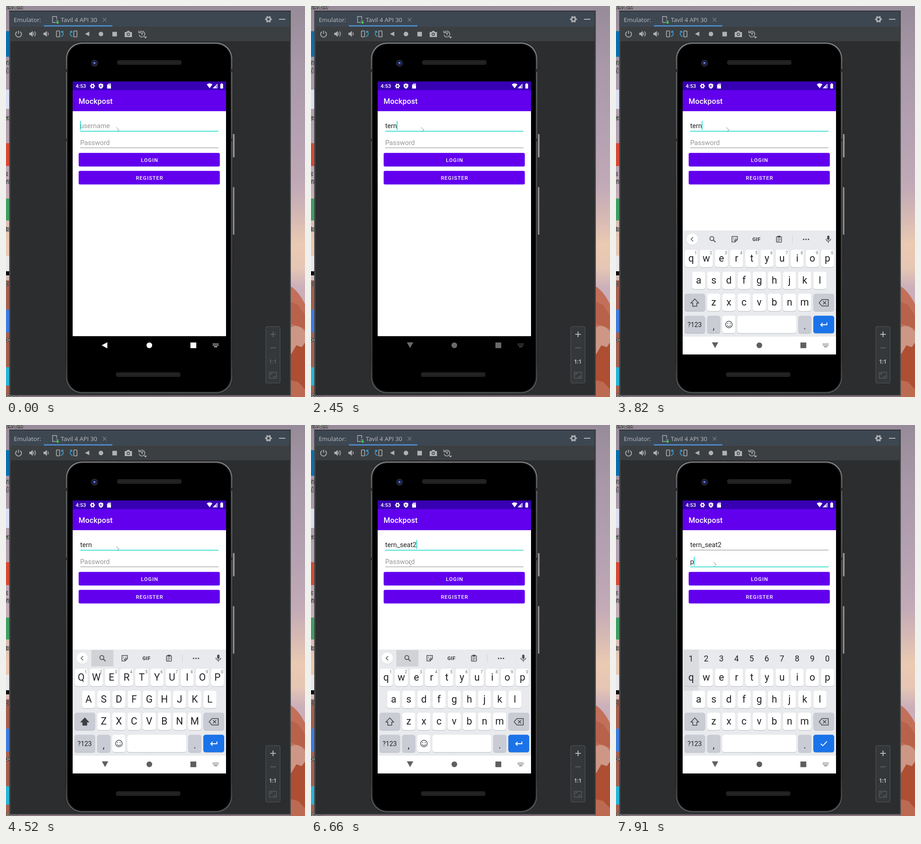
An HTML page that plays this animation: 655 px wide and 855 px high, repeating every 8 s.

```html
<!DOCTYPE html>
<html lang="en">
<head>
<meta charset="utf-8">
<title>Login form typing</title>
<style>
html, body { margin: 0; width: 100%; height: 100%; overflow: hidden; background: #2b2d2e; }
svg { display: block; width: 655px; height: 855px; }
text { font-family: Roboto, "Noto Sans", sans-serif; white-space: pre; }
.ui { font-family: "Open Sans", "Noto Sans", sans-serif; }
.mid { text-anchor: middle; }
.line { fill: none; stroke-width: 1.5; }
</style>
</head>
<body>
<svg viewBox="0 0 655 855" xmlns="http://www.w3.org/2000/svg">
<defs>
  <linearGradient id="sky" x2="0" y2="1">
    <stop offset="0" stop-color="#978b99"/><stop offset=".15" stop-color="#a898a8"/>
    <stop offset=".35" stop-color="#b6a2b2"/><stop offset=".47" stop-color="#c3abb7"/>
    <stop offset=".54" stop-color="#d6b9b4"/><stop offset=".61" stop-color="#eacab2"/>
    <stop offset=".67" stop-color="#e6c6b4"/><stop offset=".72" stop-color="#cbb0bb"/>
    <stop offset="1" stop-color="#b79aa0"/>
  </linearGradient>
  <linearGradient id="rim" x2="0" y2="1">
    <stop offset="0" stop-color="#8b8c8e"/><stop offset=".06" stop-color="#66676a"/>
    <stop offset=".5" stop-color="#4a4b4d"/><stop offset=".9" stop-color="#3a3b3c"/>
    <stop offset="1" stop-color="#5c5d5f"/>
  </linearGradient>
  <linearGradient id="btn" x2="1" y2="0">
    <stop offset="0" stop-color="#5a5a5c"/><stop offset=".5" stop-color="#a4a4a6"/><stop offset="1" stop-color="#6a6a6c"/>
  </linearGradient>
</defs>
<g id="desk"></g>
<g id="win"></g>
<g id="phone"></g>
<g id="app"></g>
<g id="board"></g>
<g id="nav"></g>
<path id="mouse" class="line" style="stroke-width:.9" stroke="#777" d="M.3 .3L6.5 6.3H4.2M2.8 8.2L4.6 10.6"/>
</svg>
<script>
const $ = id => document.getElementById(id);
const rect = (x, y, w, h, fill, rx = 0, more = '') =>
  `<rect x="${x}" y="${y}" width="${w}" height="${h}" fill="${fill}" rx="${rx}" ${more}/>`;
const circle = (x, y, r, fill, more = '') => `<circle cx="${x}" cy="${y}" r="${r}" fill="${fill}" ${more}/>`;
const shape = (d, fill, more = '') => `<path d="${d}" fill="${fill}" ${more}/>`;
const line = (d, color, w = 1.5, more = '') =>
  `<path class="line" d="${d}" stroke="${color}" style="stroke-width:${w}" ${more}/>`;
const text = (x, y, size, fill, str, more = '') =>
  `<text x="${x}" y="${y}" font-size="${size}" fill="${fill}" ${more}>${str}</text>`;
const gear = (x, y, r, color) =>
  `<circle cx="${x}" cy="${y}" r="${r * .84}" fill="none" stroke="${color}" stroke-width="${r * .3}" pathLength="12" stroke-dasharray="1 1" stroke-dashoffset=".5"/>` +
  `<circle cx="${x}" cy="${y}" r="${r * .56}" fill="none" stroke="${color}" stroke-width="${r * .42}"/>`;
const MID = 'class="mid"';

// Desktop showing around the window
function desk() {
  let s = rect(0, 0, 655, 855, 'url(#sky)');
  s += shape('M622 612Q640 622 655 652V855H622Z', '#c3705a');
  s += shape('M622 646L640 654L655 676V706L622 694Z', '#b9624b');
  s += shape('M622 704Q640 692 655 712V760H622Z', '#cd9685');
  s += shape('M622 766L636 742L648 746L655 736V855H622Z', '#ae4f33');
  s += shape('M622 818L640 822L655 838V855H622Z', '#bd6a52');
  s += rect(0, 848, 624, 7, '#85727c') + rect(0, 600, 9, 255, '#a4604f');
  const tiles = [[55, 56, '#0b6fae'], [183, 42, '#dcdff2'], [300, 50, '#d64a36'], [421, 48, '#3f9f62'],
    [546, 42, '#e8e8ea'], [664, 50, '#3e7de0'], [790, 40, '#28b5d8']];
  for (const [y, h, c] of tiles) s += rect(0, y, 7, h, c);
  s += rect(0, 580, 7, 9, '#111');
  const bits = [[128, 're'], [146, 'd'], [249, 'se'], [371, 'c'], [388, 're'], [492, 'to'], [612, 'E'], [734, 'oc']];
  const tag = 'class="ui" stroke="#222" stroke-width="2" paint-order="stroke"';
  for (const [y, w] of bits) s += text(-2, y, 12, '#fff', w, tag);
  return s + text(0, 6, 12, '#fff', 'cle Bin', tag) + text(1, 855, 12, '#fff', 'ook', tag);
}

function frame() {
  const g = '#afb1b3', b = '#389fd6';
  let s = rect(7, 10, 617, 842, '#46484a') + rect(10, 12, 611, 33, '#3d4752') + rect(10, 45, 611, 32, '#3c3f41');
  s += rect(10, 77, 611, 773, '#2b2d2e') + rect(7, 10, 617, 2, '#303236') + rect(621, 12, 1, 838, '#333537');
  s += rect(83, 42, 150, 3, '#4a88c7');
  s += text(17, 34.5, 13.2, '#bbbdbf', 'Emulator:', 'class="ui"') + text(120, 34.5, 13.2, '#bbbdbf', 'Tavil 4 API 30', 'class="ui"');
  s += line('M109 36H102V23H111V29', g, 1.4) + line('M109 32H115M110 36H113', g, 1.2) + circle(113, 36, 2.6, '#3fd24b');
  s += line('M212 26L220 34M220 26L212 34', '#74808a', 1.2);
  s += gear(575, 29, 7.6, g) + rect(598, 28, 14, 2, g);
  s += line('M24 56.2A6.4 6.4 0 1 0 31 56.2M27.5 54V61', g, 1.8);
  const horn = x => shape(`M${x} 58.5h3l4.5-4v13l-4.5-4h-3z`, g);
  s += horn(51) + line('M60 58Q62 61 60 64M62.5 55.5Q67 61 62.5 66.5', g) + horn(82) + line('M91.5 58Q94 61 91.5 64', g);
  s += rect(110.5, 54.5, 7, 13, 'none', 1, `stroke="${g}" stroke-width="1.6"`);
  s += line('M120 67Q127 64 125 58L122 55M122 59V55H126', b, 1.7);
  s += rect(148.5, 54.5, 7, 13, 'none', 1, `stroke="${g}" stroke-width="1.6"`);
  s += line('M146 67Q139 64 141 58L144 55M144 59V55H140', b, 1.7);
  s += shape('M173 61L182.5 56V66Z', g) + circle(208, 61.3, 5, g) + rect(233, 56.5, 10, 10, g);
  s += shape('M260 57h4l2-2.5h4l2 2.5h4v11h-16z', g) + circle(268, 62, 3.4, '#3c3f41') + circle(268, 62, 2, g);
  s += line('M291.5 63A6.4 6.4 0 1 0 293 57M291 54V58.5H296M296 59H301M298 59V64', g, 1.6) + shape('M302 67h7l-3.5 4z', g);
  s += rect(569, 701, 31.5, 123.5, '#35383a', 3, 'stroke="#54575a"');
  s += `<g id="zoom">${rect(579, 717, 12, 2, 'currentColor')}${rect(584, 712, 2, 12, 'currentColor')}` +
    text(584.5, 781.5, 11.5, 'currentColor', '1:1', 'class="mid ui" font-weight="700"') + '</g>';
  s += rect(579, 746.5, 12, 2, '#5a5d5f');
  s += rect(577, 801, 15.5, 13, 'none', 0, 'stroke="#5a5d5f" stroke-width="1.4"');
  return s + line('M580 807V804H584M589 808V811H585', '#5a5d5f', 1.3);
}

function phone() {
  let s = rect(496, 280, 5, 51, 'url(#btn)', 1.5) + rect(496, 396, 4.5, 104, 'url(#btn)', 1.5);
  s += rect(130.5, 79.5, 366, 768, 'url(#rim)', 36, 'stroke="#1a1a1b"');
  s += rect(134, 82.5, 359, 762, '#0c0c0d', 33, 'stroke="#2c2c2e"');
  s += rect(136, 85, 355, 757, '#000', 31);
  for (const y of [138, 290]) s += rect(130, y, 5, 6, '#2a2a2c') + rect(492, y, 5, 6, '#2a2a2c');
  s += circle(194, 125, 7.5, '#2a2b30') + circle(194, 125, 5.2, '#10143a') + circle(194, 125, 3, '#34449c') + circle(193.3, 124.3, 1.2, '#aab8f0');
  for (const [x, y] of [[244.5, 119.5], [242, 802]])
    s += rect(x, y, 139, 8, '#1c1c1d', 2, 'stroke="#39393b"') + line(`M${x + 3} ${y + 4}h133`, '#323234', 2, 'stroke-dasharray="2 1"');
  return s;
}

function app() {
  const w = '#fff';
  let s = rect(146, 165, 336, 557, w) + rect(146, 165, 336, 20, '#3700b3') + rect(146, 184, 336, 46, '#6200ee');
  s += text(152.5, 179.3, 11.6, w, '4:53', 'font-weight="500"') + gear(189.5, 175, 5.6, w);
  s += shape('M208 169.2l5 2v3.6q0 4-5 6.2q-5-2.2-5-6.2v-3.6z', w) + shape('M206.5 172.8l3.6 2.2-3.6 2.2z', '#3700b3');
  s += shape('M224.5 169.7h5.5v10.8h-8.5v-7.8z', w) + line('M225 171.3v2.2M227 171.3v2.2M229 171.3v2.2', '#3700b3', .8);
  s += shape('M439.8 171.5Q446 167 452.2 171.5L446 180Z', w);
  s += shape('M463.2 169.5V180H453Z', w, 'opacity=".45"') + line('M462.6 170.8V179.5H454Z', w, 1) + shape('M459.5 173.4V180H453Z', w);
  s += rect(469.5, 170.5, 6, 10, w, .8) + rect(471, 169.2, 3, 2, w);
  s += text(159, 214.2, 16.35, w, 'Mockpost', 'font-weight="500" letter-spacing=".0125em"');
  [267, 303.6].forEach((y, i) => {
    s += `<text id="t${i}" x="162.4" y="${y}" font-size="14.7"></text>`;
    s += `<rect id="thin${i}" x="162.5" y="${y + 6}" width="303" height="1" fill="#868686"/>`;
    s += `<rect id="bold${i}" x="162.5" y="${y + 6}" width="303" height="1.4" fill="#03d4c4"/>`;
  });
  s += rect(0, 0, 1.5, 19.5, '#03d4c4', 0, 'id="caret"');
  [[321.3, 'LOGIN'], [360.6, 'REGISTER']].forEach(([y, label]) => {
    s += rect(159.2, y, 309.2, 29.6, '#6200ee', 3);
    s += text(314.6, y + 19.2, 11.44, w, label, `${MID} font-weight="500" letter-spacing=".0893em"`);
  });
  return s;
}

const STEP = 33.2;
const key = (x, y, w, fill) => rect(x, y + 1, w, 38.3, '#b4b8bd', 5) + rect(x, y, w, 38.3, fill, 5);

// mode: 'abc', 'caps' or 'pin'; mark: highlighted item
function board(mode, mark) {
  const pin = mode === 'pin', ink = '#202124', g = '#4a4d51', gray = '#c9ccd4', w = '#fff';
  let s = rect(146, 491, 336, 232, '#e8eaed') + rect(146, 723, 336, 39, w);
  if (mark === 'find') s += rect(187, 492, 48.5, 36, '#d0d2d6');
  if (pin) {
    [...'1234567890'].forEach((c, i) => s += text(164.3 + STEP * i, 517.3, 17.8, ink, c, MID));
  } else {
    s += circle(167, 510.8, 12.3, '#c8cacd') + circle(167, 510, 12.3, w) + line('M169 505.5L164.5 510L169 514.5', g);
    s += circle(210, 508.5, 4.4, 'none', `stroke="${g}" stroke-width="1.7"`) + line('M213.2 511.8L218 516.5', g, 1.9);
    s += line('M254 504H266V511L261 516H254Z M266 511H261V516', g) + circle(257.5, 508, 1, g) + circle(262.5, 508, 1, g) + line('M257 511Q259 513.5 261 512', g, 1.2);
    s += text(307.7, 514, 11, g, 'GIF', `${MID} font-weight="900" letter-spacing=".4"`);
    s += rect(351.5, 504.5, 11, 12, 'none', 1, `stroke="${g}" stroke-width="1.5"`) + rect(354, 502.5, 6, 4, g) + line('M353.5 509H360.5M353.5 511.5H360.5M353.5 514H358', g, 1);
    s += rect(386, 502, 1, 17, '#cfd1d4');
    for (const x of [411, 416.3, 421.6]) s += circle(x, 510.3, 1.6, g);
    s += rect(462.6, 502, 5, 9.5, g, 2.5) + line('M459.8 509Q460 514 465.1 514T470.4 509M465.1 514V518', g, 1.4);
  }
  ['qwertyuiop', 'asdfghjkl', 'zxcvbnm'].forEach((row, r) => {
    const y = 533 + 48 * r, x0 = [164.6, 181, 214.1][r];
    [...row].forEach((c, i) => {
      const x = x0 + STEP * i;
      s += key(x - 14.3, y, 28.6, w);
      if (!r && !i && mark === 'q') s += rect(148, 491, 33.5, 90, '#000', 0, 'opacity=".06"') + rect(x - 14.3, y, 28.6, 38.3, '#dadce0', 5);
      s += text(x, y + 26.3, 21.5, ink, mode === 'caps' ? c.toUpperCase() : c, MID);
      if (!r && !pin) s += text(x + 10, y + 10.3, 8.6, '#5f6368', (i + 1) % 10, MID);
    });
  });
  s += key(150, 629, 45.3, gray) + line('M172.6 640.5L181 649.5H177V656.5H168.2V649.5H164.2Z', '#3c4043');
  if (mode === 'caps') s += shape('M172.6 640.5L181 649.5H177V656.5H168.2V649.5H164.2Z', '#3c4043');
  s += key(432.5, 629, 45.5, gray) + line('M451 642H465V656H451L445 649ZM453.5 645.5L460.5 652.5M460.5 645.5L453.5 652.5', '#3c4043');
  s += key(150, 677.3, 45.3, gray) + text(172.4, 701.6, 14.4, ink, '?123', MID);
  s += key(199.7, 677.3, 28.8, gray) + text(214, 706.5, 20, ink, ',', MID);
  s += pin ? key(233, 677.3, 162, w) : key(233, 677.3, 28.5, w) + key(266, 677.3, 129, w);
  if (!pin) s += circle(247.4, 696.5, 7.2, 'none', `stroke="${g}" stroke-width="1.5"`) + circle(244.8, 694.6, 1.1, g) + circle(250, 694.6, 1.1, g) + line('M243.5 698.3Q247.4 703.5 251.3 698.3', g, 1.4);
  s += key(399.3, 677.3, 28.7, gray) + text(413.6, 706.5, 20, ink, '.', MID);
  s += key(432.3, 677.3, 45.7, '#1a73e8');
  return s + line(pin ? 'M448.5 697L453 701.3L462 692' : 'M462 692V697H448.5M452.5 693L448.5 697L452.5 701', w, 1.8);
}

function nav(back) {
  const c = 'currentColor';
  let s = shape(back ? 'M209.5 742L222 735.3V748.7Z' : 'M210 735.5H224L217 748Z', c);
  s += circle(314, 742, 6.2, c) + rect(404, 735.8, 12.8, 12.4, c);
  for (const y of [738, 741]) for (let i = 0; i < 5; i++) s += rect(453 + i * 2.7, y, 1.7, 1.7, c);
  return s + rect(455.7, 744.3, 7.2, 1.6, c);
}

// Changes over time; each row adds to the state before it
const steps = [
  [0, { user: '', pass: '', caret: 1, focus: 0, at: 0, back: 1, ink: '#fff', zoom: 0, keys: '', mark: '', mouse: [241, 265] }],
  [940, { zoom: 1 }],
  [1470, { caret: 0, back: 0 }],
  [1750, { user: 'te', caret: 1 }],
  [1870, { user: 'ter' }],
  [2020, { user: 'tern' }],
  [2150, { ink: '#d4d4d4' }],
  [2310, { ink: '#9c9c9c' }],
  [2450, { ink: '#6a6a6a' }],
  [3670, { caret: 0 }],
  [3820, { caret: 1, keys: 'abc', ink: '#5f5f5f' }],
  [4100, { caret: 0 }],
  [4520, { keys: 'caps', mark: 'find' }],
  [4640, { user: 'tern_', caret: 1, keys: 'abc' }],
  [4790, { user: 'tern_se' }],
  [5070, { user: 'tern_seat' }],
  [5350, { user: 'tern_seat2' }],
  [5910, { caret: 0 }],
  [6070, { mouse: [225, 293] }],
  [6210, { mouse: [215.5, 308] }],
  [6360, { mouse: [213, 304], caret: 1 }],
  [6510, { mouse: [213, 301] }],
  [6660, { mouse: [213, 299.3] }],
  [6810, { at: 1, focus: .4 }],
  [6960, { focus: .75 }],
  [7090, { focus: 1 }],
  [7390, { keys: 'pin', mark: 'q', caret: 0 }],
  [7910, { pass: 'p', caret: 1 }]
];
const LOOP = 8000;
let all = {};
const states = steps.map(([t, change]) => [t, all = { ...all, ...change }]);

function draw(s) {
  [[s.user, 'username'], [s.pass, 'Password']].forEach(([v, hint], i) => {
    const el = $('t' + i), on = i ? s.focus : 1 - s.focus;
    el.textContent = v || hint;
    el.setAttribute('fill', v ? '#212121' : '#969696');
    $('bold' + i).setAttribute('opacity', on);
    $('thin' + i).setAttribute('opacity', 1 - on);
  });
  const typed = s.at ? s.pass : s.user;
  const x = 162.2 + (typed ? $('t' + s.at).getComputedTextLength() : 0);
  $('caret').setAttribute('x', x);
  $('caret').setAttribute('y', s.at ? 288.3 : 251.5);
  $('caret').setAttribute('opacity', s.caret);
  $('zoom').style.color = s.zoom ? '#b4b6b8' : '#5a5d5f';
  $('board').innerHTML = s.keys && board(s.keys, s.mark);
  $('nav').innerHTML = nav(s.back);
  $('nav').style.color = s.ink;
  $('mouse').setAttribute('transform', `translate(${s.mouse})`);
}

$('desk').innerHTML = desk();
$('win').innerHTML = frame();
$('phone').innerHTML = phone();
$('app').innerHTML = app();

const start = performance.now();
let shown;
function tick() {
  const t = (performance.now() - start) % LOOP;
  const now = states.filter(([at]) => at <= t).pop()[1];
  if (now !== shown) draw(shown = now);
  requestAnimationFrame(tick);
}
tick();
</script>
</body>
</html>
```
